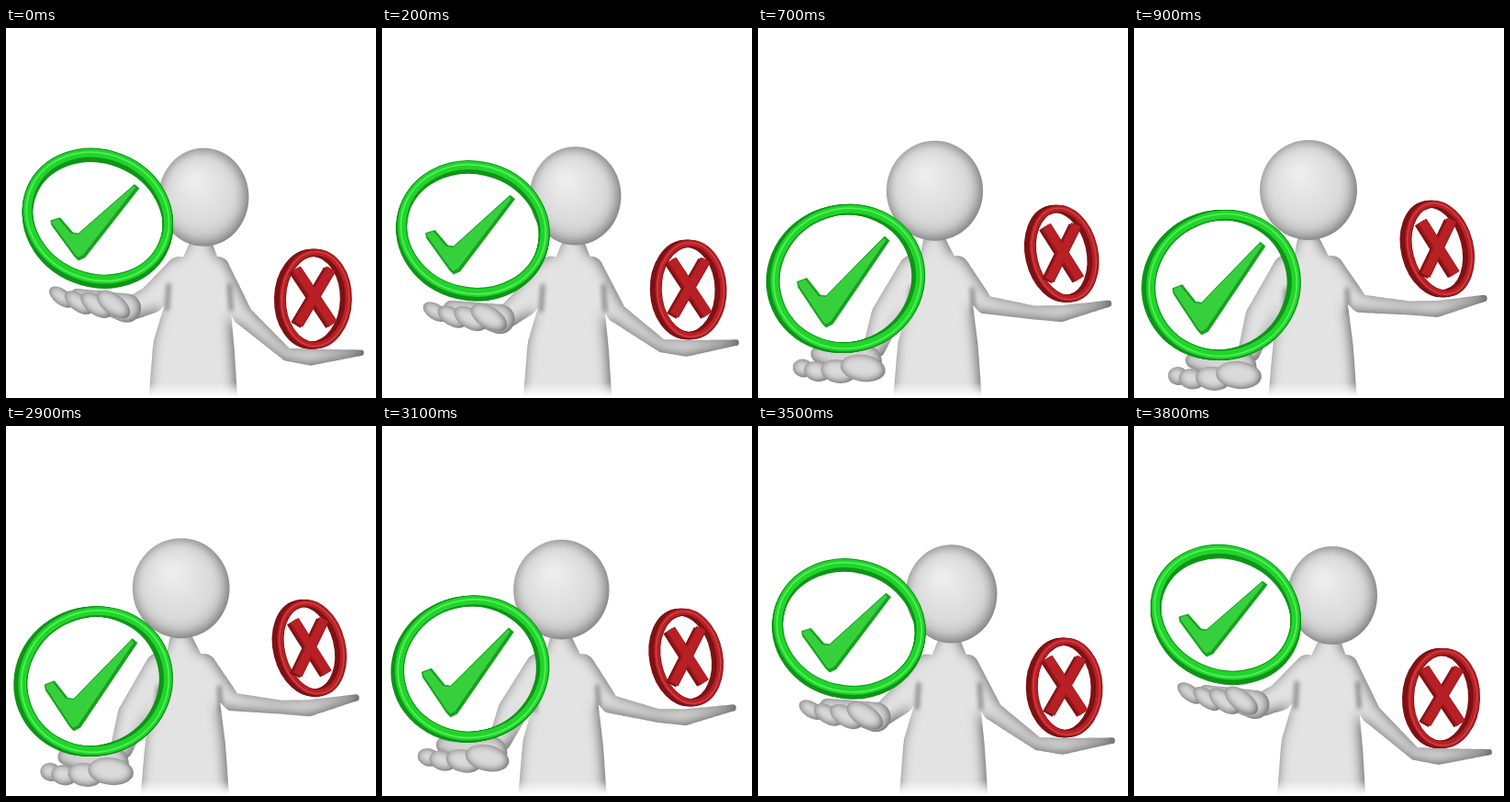
Animation, 403 px wide and 403 px high, one loop 5.8 s. Source, as an HTML page with a canvas:

```html
<!DOCTYPE html>
<html lang="en">
<head>
<meta charset="utf-8">
<title>Right or wrong</title>
<style>
html, body { margin: 0; width: 100%; height: 100%; overflow: hidden; background: #fff; }
canvas { display: block; width: 403px; height: 403px; }
</style>
</head>
<body>
<canvas id="stage" width="403" height="403"></canvas>
<script>
const SIZE = 403, LOOP = 5800, TAU = Math.PI * 2;
const layer = () => {
  const c = document.createElement('canvas');
  c.width = c.height = SIZE;
  return c.getContext('2d');
};
const ctx = document.getElementById('stage').getContext('2d');
const solid = layer(), rim = layer();

// 0: green ring held high, 1: green ring held low.
let pose = 0;
const mix = (a, b, t = pose) => a + (b - a) * t;
const mixAll = (a, b, t = pose) => a.map((v, i) => mix(v, b[i], t));

// A tapered limb: circles swept along joints [x, y, radius].
function limb(...joints) {
  const path = new Path2D();
  for (let i = 1; i < joints.length; i++) {
    for (let t = 0; t <= 1; t += .04) {
      const [x, y, r] = mixAll(joints[i - 1], joints[i], t);
      path.moveTo(x + r, y);
      path.arc(x, y, r, 0, TAU);
    }
  }
  return path;
}

function oval([x, y, rx, ry, turn = 0], inset = 0) {
  const path = new Path2D();
  path.ellipse(x, y, rx - inset, ry - inset, turn, 0, TAU);
  return path;
}

function line(...points) {
  const path = new Path2D();
  points.forEach(([x, y]) => path.lineTo(x, y));
  return path;
}

function stroke(path, color, width, dx = 0, dy = 0, c = ctx) {
  c.save();
  c.translate(dx, dy);
  c.strokeStyle = color;
  c.lineWidth = width;
  c.stroke(path);
  c.restore();
}

// Fills the union of the paths, darkened softly toward its lower right outline.
function clay(paths, blur, tone, edge, creases = []) {
  solid.globalCompositeOperation = rim.globalCompositeOperation = 'source-over';
  solid.clearRect(0, 0, SIZE, SIZE);
  solid.fillStyle = tone;
  rim.fillStyle = edge;
  rim.fillRect(0, 0, SIZE, SIZE);
  rim.globalCompositeOperation = 'destination-out';
  paths.forEach(p => { solid.fill(p); rim.fill(p); });

  solid.globalCompositeOperation = 'source-atop';
  solid.filter = `blur(${blur}px)`;
  solid.drawImage(rim.canvas, -blur * .3, -blur * .25);
  solid.filter = 'blur(2.5px)';
  creases.forEach(p => stroke(p, '#777', 4, 0, 0, solid));
  solid.filter = 'none';
  ctx.drawImage(solid.canvas, 0, 0);
}

function drawBody() {
  const neck = mixAll([213, 236, 12], [190.5, 236, 13.5]);
  const chest = mixAll([210.5, 290, 33], [199, 295, 33]);
  const waist = mixAll([204.5, 350, 44.5], [195, 350, 44]);
  const base = mixAll([204, 415, 49], [194.5, 415, 49]);
  const torso = limb(neck, chest, waist, base);

  const leftArm = limb(
    mixAll([189, 263, 14], [166, 262, 15]),
    mixAll([159, 295, 15], [138, 315, 17]),
    mixAll([140, 303, 13], [125, 354, 12]));
  const rightArm = limb(
    mixAll([231, 262, 13], [215, 262, 14]),
    mixAll([258, 313, 11], [246, 300, 10]),
    mixAll([306, 357, 7], [300, 305, 7.5]),
    mixAll([332, 360, 9], [330, 306, 9]),
    mixAll([389, 355, 3], [383, 294, 3.5]));

  const [x, y, r] = chest;
  const creases = [-1, 1].map(side =>
    line([x + side * r, y - 12], [x + side * (r + 2), y + 18]));
  clay([torso, leftArm, rightArm], 7, '#e3e3e3', '#5c5c5c', creases);

  const fade = ctx.createLinearGradient(0, 386, 0, 402);
  fade.addColorStop(0, 'rgba(255,255,255,0)');
  fade.addColorStop(1, '#fff');
  ctx.fillStyle = fade;
  ctx.fillRect(140, 386, 120, 17);
}

function drawHead() {
  const head = mixAll([216, 184.5, 49, 53.5], [190, 176.5, 53, 54.5]);
  const [x, y, r] = head;
  const light = solid.createRadialGradient(x - 10, y - 18, 5, x, y, r * 1.15);
  light.addColorStop(0, '#ededed');
  light.addColorStop(.6, '#dadada');
  light.addColorStop(1, '#bcbcbc');
  clay([oval(head)], 7, light, '#6a6a6a');
}

function drawLeftHand() {
  const palm = limb(
    mixAll([78, 290, 8], [65, 362, 9]),
    mixAll([134, 304, 16], [117, 370, 19]));
  clay([palm], 5, '#d4d4d4', '#585858');

  const first = mixAll([61, 291, 16, 8.5, .65], [48, 379, 11, 10, .2]);
  const last = mixAll([117, 299, 21, 11, .65], [114, 378, 25, 15, .1]);
  for (let i = 0; i < 4; i++) {
    const t = i / 3;
    const finger = mixAll(first, last, t ** mix(1, 1.35));
    finger[1] += 4 * Math.sin(Math.PI * t);
    clay([oval(finger)], 4, '#dadada', '#565656');
  }
}

// A tube seen at an angle, with its far side shifted by [dx, dy].
function drawRing(shape, width, [dx, dy], [dark, main, light]) {
  const tube = oval(shape, width / 2);
  for (let t = 1; t >= 0; t -= .25) stroke(tube, dark, width, dx * t, dy * t);
  stroke(tube, main, width * .78, 0, -.3);
  stroke(oval(shape, width * .4), light, width * .16);
}

function drawCross() {
  const colors = ['#7d1215', '#b92025', '#d14347'];
  const ring = mixAll([337, 296.5, 40, 54.5, .03], [332.8, 240.5, 37, 53.5, -.25]);
  drawRing(ring, 8, [-5, 0], colors);

  const [x, y] = mixAll([336, 294], [331.5, 239.5]);
  const bars = new Path2D();
  const halves = [mixAll([20, 30], [18, 28.5]), mixAll([18, -30], [14.5, -30])];
  for (const [w, h] of halves) bars.addPath(line([x - w, y - h], [x + w, y + h]));
  stroke(bars, colors[0], 12, -2.5, 1);
  stroke(bars, '#9c171b', 12);
  stroke(bars, colors[1], 9, .5, -.5);
}

function drawTick() {
  const ring = mixAll([100, 203.5, 83.5, 72.8, .4], [97, 280, 85.6, 81.3, -.4]);
  drawRing(ring, 11.5, mixAll([0, 4], [-4, 0]), ['#0f9418', '#20d52a', '#55ec5c']);

  const outline = [[49, 208], [59, 205], [73, 221], [79, 222], [140, 169],
    [145, 173], [86, 248], [79, 251], [75, 247], [50, 213]];
  const tick = line(...outline.map(([x, y]) => [
    mix(x, 41 + (x - 48) * 1.05),
    mix(y, 233 + (y - 169) * 1.2 + (145 - x) * .04)
  ]));
  tick.closePath();
  ctx.lineJoin = 'round';
  ctx.fillStyle = '#36d03d';
  ctx.fill(tick);
  ctx.save();
  ctx.clip(tick);
  stroke(tick, '#189f20', 4, -1, -1);
  ctx.restore();
  stroke(tick, '#1cab24', .8);
}

// Ten steps each way, with a long rest at both ends.
function stepAt(t) {
  return t < 2900 ? Math.min(9, Math.floor(t / 100))
                  : Math.min(19, 10 + Math.floor((t - 2900) / 100));
}

let shown = -1;
const start = performance.now();
function frame() {
  const step = stepAt(Math.max(0, performance.now() - start) % LOOP);
  if (step !== shown) {
    shown = step;
    pose = (1 - Math.cos(Math.PI * (step + 1) / 10)) / 2;
    ctx.fillStyle = '#fff';
    ctx.fillRect(0, 0, SIZE, SIZE);
    drawBody();
    drawHead();
    drawLeftHand();
    drawCross();
    drawTick();
  }
  requestAnimationFrame(frame);
}
frame();
</script>
</body>
</html>
```
